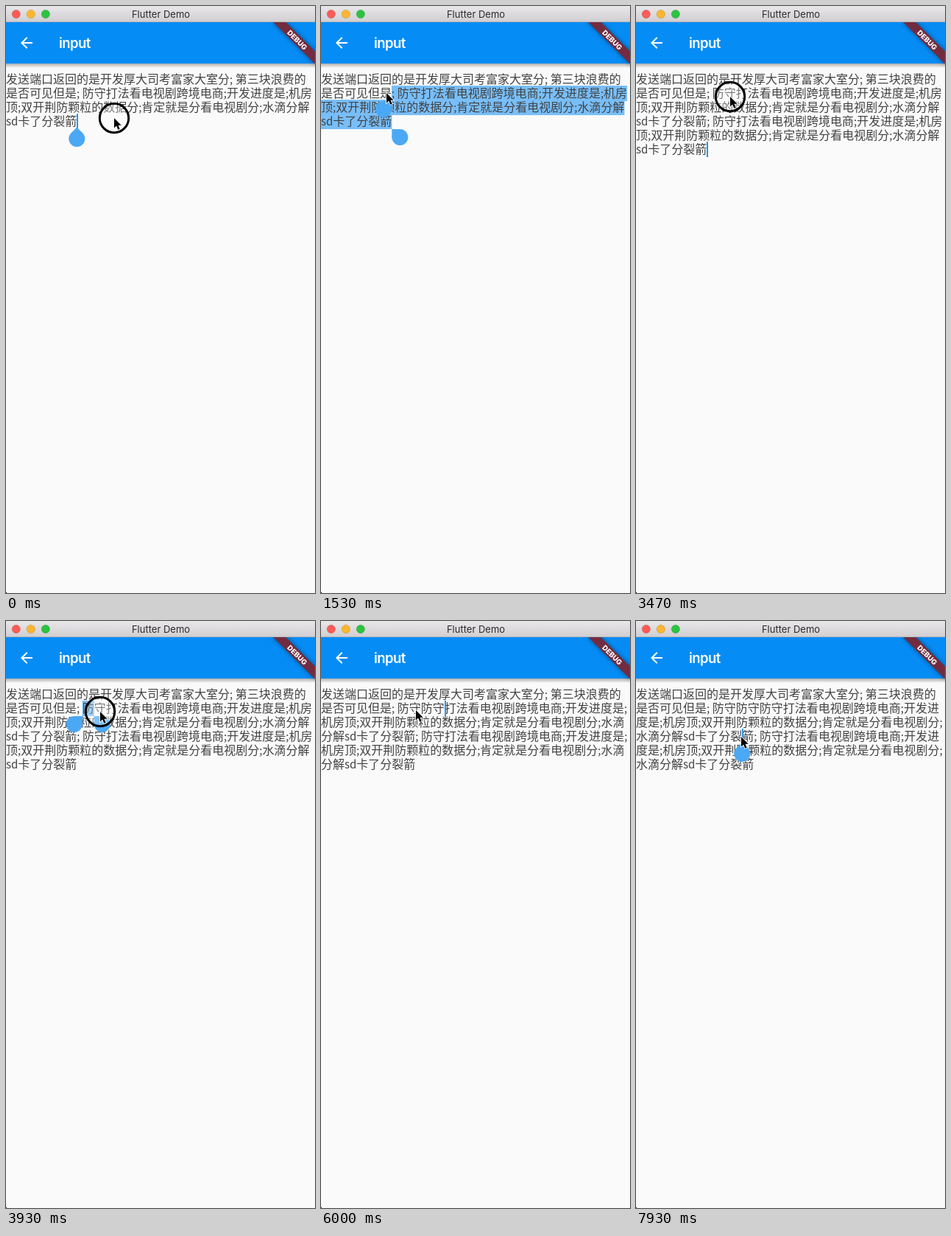
An HTML page with a canvas that plays this animation: 420 by 796 pixels, repeating every 8000 ms.

```html
<!DOCTYPE html>
<html lang="zh-CN">
<head>
<meta charset="utf-8">
<title>Flutter Demo</title>
<style>
html, body { margin: 0; width: 100%; height: 100%; overflow: hidden; background: #fafafa; }
canvas { display: block; width: 420px; height: 796px; }
</style>
</head>
<body>
<canvas></canvas>
<script>
const W = 420, H = 796, LOOP = 8000, LINE = 19, TOP = 89, BOX = 21;
const canvas = document.querySelector('canvas');
const ctx = canvas.getContext('2d');
const dpr = window.devicePixelRatio || 1;
canvas.width = W * dpr;
canvas.height = H * dpr;

const FAMILY = '"Noto Sans CJK SC", "Noto Sans CJK", sans-serif';
const HEAD = '发送端口返回的是开发厚大司考富家大室分; 第三块浪费的是否可见但是';
const TAIL = '; 防守打法看电视剧跨境电商;开发进度是;机房顶;双开荆防颗粒的数据分;肯定就是分看电视剧分;水滴分解sd卡了分裂箭';
const WORD = '防守';
const word = HEAD.length + 2;
const once = HEAD + TAIL;
const twice = once + TAIL;
const insertWord = text => text.slice(0, word) + WORD + text.slice(word);
const pasted = insertWord(twice);
const pastedAgain = insertWord(pasted);
const tap = pastedAgain.indexOf('箭');

// Each state: start time, text, selection start and end, handles shown
const states = [
  [0, once, once.length, once.length, true],
  [670, once, once.length - 1, once.length, true],
  [1070, once, once.indexOf('卡'), once.length, true],
  [1140, once, once.indexOf('颗'), once.length, true],
  [1270, once, HEAD.length, once.length, true],
  [2000, once, once.length, once.length, false],
  [2270, twice, twice.length, twice.length, false],
  [3670, twice, word, word + 1, true],
  [4070, twice, word, word + 2, true],
  [5070, twice, word + 2, word + 2, false],
  [5600, pasted, word + 4, word + 4, false],
  [6330, pastedAgain, word + 6, word + 6, false],
  [6720, pastedAgain, tap, tap, true]
];

// Pointer path: time, x, y
const path = [
  [0, 147, 152], [130, 147, 152], [400, 88, 156], [800, 88, 156],
  [930, 70, 178], [1000, 70, 178], [1300, 89, 118], [2750, 89, 118],
  [3150, 128, 123], [3930, 128, 123], [4070, 129, 121], [6340, 129, 121],
  [6580, 144, 157], [6730, 144, 157], [6860, 144, 187], [7500, 144, 187],
  [7800, 143, 157], [LOOP, 143, 157]
];
const presses = [[0, 130], [420, 780], [960, 1400], [3350, 4130], [6590, 6720], [6880, 7480]];

// Latin letters and semicolons are set slightly smaller than the rest
const fontFor = text => `300 ${/[a-z;]/.test(text) ? 15 : 16}px ${FAMILY}`;

function widthOf(text) {
  ctx.font = fontFor(text);
  return ctx.measureText(text).width;
}

function layout(text) {
  const spots = [];
  let x = 0, row = 0;
  for (const unit of text.match(/[a-z]+|[^]/g)) {
    if (x + widthOf(unit) > W && unit !== ' ') { x = 0; row++; }
    for (const char of unit) {
      spots.push({ char, x, row });
      x += widthOf(char);
    }
  }
  spots.push({ char: '', x, row });
  return spots;
}

function rect(x, y, w, h, fill) {
  ctx.fillStyle = fill;
  ctx.fillRect(x, y, w, h);
}

function disc(x, y, r, fill) {
  ctx.fillStyle = fill;
  ctx.beginPath();
  ctx.arc(x, y, r, 0, 7);
  ctx.fill();
}

function label(text, x, y, font, fill, align = 'left') {
  ctx.font = font;
  ctx.textAlign = align;
  ctx.fillStyle = fill;
  ctx.fillText(text, x, y);
}

function drawWindow() {
  rect(0, 0, W, H, '#fafafa');
  const shade = ctx.createLinearGradient(0, 78, 0, 84);
  shade.addColorStop(0, 'rgba(0,0,0,.3)');
  shade.addColorStop(1, 'rgba(0,0,0,0)');
  rect(0, 78, W, 6, shade);
  rect(0, 22, W, 56, '#058cf5');

  ctx.save();
  ctx.translate(16, 38);
  ctx.fillStyle = '#fff';
  ctx.fill(new Path2D('M20 11H7.83l5.59-5.59L12 4l-8 8 8 8 1.41-1.41L7.83 13H20z'));
  ctx.restore();
  ctx.letterSpacing = '-0.6px';
  label('input', 72, 57, '600 18.5px Inter, sans-serif', '#fff');
  ctx.letterSpacing = '0px';

  ctx.save();
  ctx.beginPath();
  ctx.rect(0, 22, W, H);
  ctx.clip();
  ctx.translate(W, 22);
  ctx.rotate(Math.PI / 4);
  ctx.shadowColor = 'rgba(0,0,0,.5)';
  ctx.shadowBlur = 6 * dpr;
  rect(-40, 28, 80, 12, '#732c3f');
  ctx.shadowColor = 'transparent';
  label('DEBUG', 0, 37.6, '800 9.6px Inter, sans-serif', '#fff', 'center');
  ctx.restore();

  const chrome = ctx.createLinearGradient(0, 0, 0, 22);
  chrome.addColorStop(0, '#e9e7e9');
  chrome.addColorStop(1, '#d0ced0');
  rect(0, 0, W, 22, chrome);
  rect(0, 21, W, 1, '#b4b2b4');
  ctx.lineWidth = 1;
  ctx.strokeStyle = 'rgba(0,0,0,.12)';
  ['#fc5b57', '#fdb62f', '#2bc440'].forEach((color, i) => {
    disc(13.8 + 20 * i, 11, 5.7, color);
    ctx.stroke();
  });
  label('Flutter Demo', 210.5, 16, '13px Inter, sans-serif', '#2c2c2c', 'center');
  rect(0, H - 1, 1, 1, '#000');
}

// A disc with one square corner, turned towards the text
function handle(x, y, angle) {
  ctx.save();
  ctx.translate(x, y);
  ctx.rotate(angle);
  disc(0, 0, 11, '#4ba8f5');
  ctx.fillRect(-11, -11, 11, 11);
  ctx.restore();
}

function drawEditor(t) {
  const [since, text, start, end, handles] = states.filter(s => s[0] <= t).pop();
  const spots = layout(text);
  const from = spots[start], to = spots[end];
  const rowTop = row => TOP + LINE * row;

  for (let row = from.row; start < end && row <= to.row; row++) {
    const last = spots.filter(s => s.row === row).pop();
    const left = row === from.row ? from.x : 0;
    const right = row === to.row ? to.x : last.x + widthOf(last.char);
    rect(left, rowTop(row), right - left, BOX, '#78bef9');
  }

  for (const { char, x, row } of spots) {
    label(char, x, 105 + LINE * row, fontFor(char), '#424242');
  }

  const bottom = rowTop(to.row) + BOX;
  if (start === end) {
    if (Math.floor((t - since) / 500) % 2 === 0) {
      rect(Math.round(to.x), rowTop(to.row), 2, BOX, '#2196f3');
    }
    if (handles) handle(to.x, bottom + 13, Math.PI / 4);
  } else if (handles) {
    handle(from.x - 11, rowTop(from.row) + BOX + 11, Math.PI / 2);
    handle(to.x + 11, bottom + 11, 0);
  }
}

function drawPointer(t) {
  const i = path.findIndex(p => p[0] > t);
  const [t0, x0, y0] = path[i - 1], [t1, x1, y1] = path[i];
  const k = (t - t0) / (t1 - t0), ease = k * k * (3 - 2 * k);
  const x = x0 + (x1 - x0) * ease, y = y0 + (y1 - y0) * ease;

  if (presses.some(([a, b]) => t >= a && t < b)) {
    disc(x, y, 19.7, 'rgba(255,255,255,.3)');
    ctx.lineWidth = 3;
    ctx.strokeStyle = '#000';
    ctx.stroke();
  }
  ctx.save();
  ctx.translate(x, y);
  const arrow = new Path2D('M0 0V13.5L3.1 10.6L5.3 15.7L7.7 14.7L5.5 9.7H9.7Z');
  ctx.lineWidth = 1.6;
  ctx.strokeStyle = '#fff';
  ctx.stroke(arrow);
  ctx.fillStyle = '#000';
  ctx.fill(arrow);
  ctx.restore();
}

function frame() {
  const t = performance.now() % LOOP;
  ctx.setTransform(dpr, 0, 0, dpr, 0, 0);
  drawWindow();
  drawEditor(t);
  drawPointer(t);
  requestAnimationFrame(frame);
}
frame();
</script>
</body>
</html>
```
